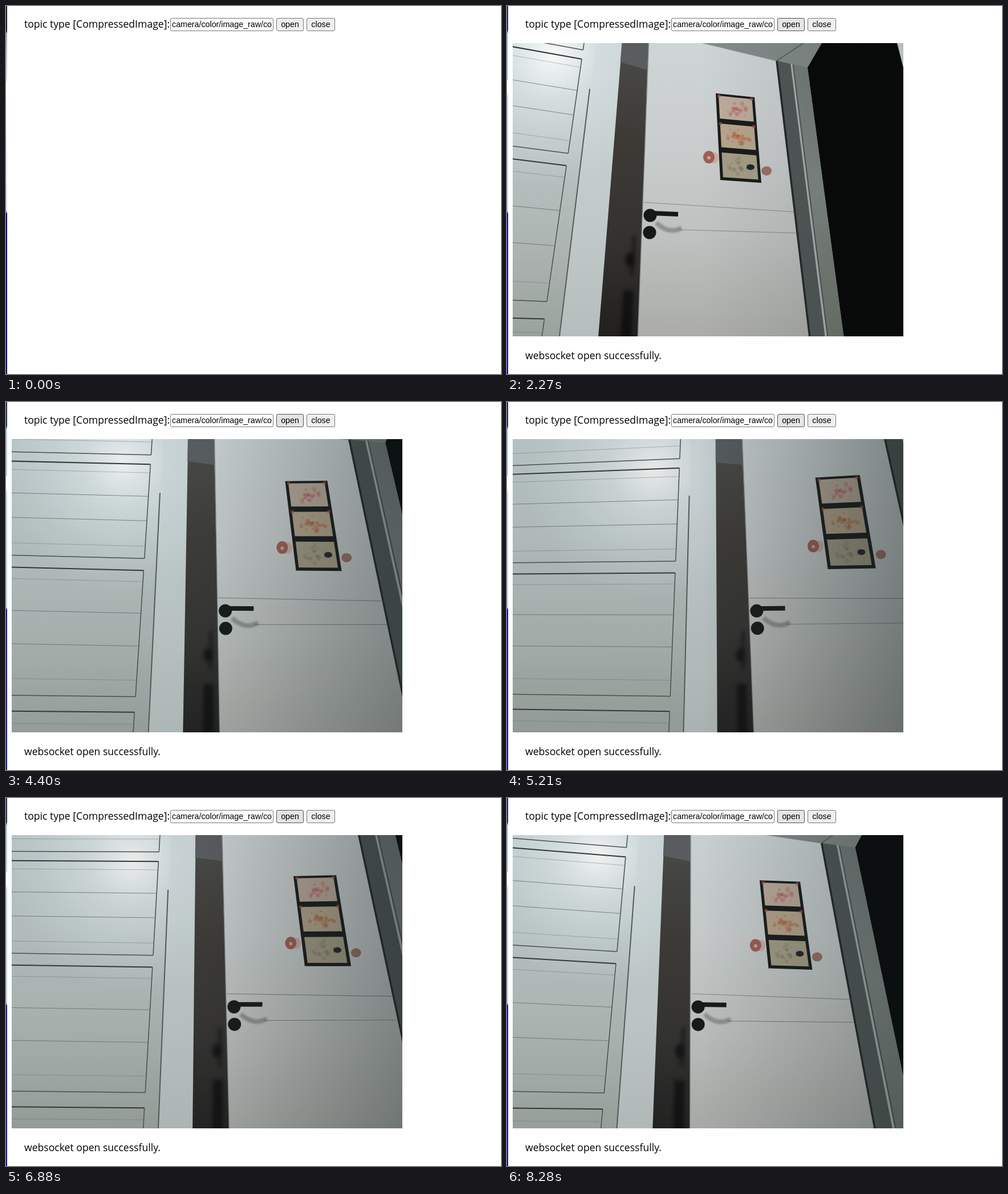
Write an HTML page with a canvas that moves like this. It is 868 px wide and 645 px high and loops after 9280 ms.

```html
<!DOCTYPE html>
<html lang="en">
<head>
<meta charset="utf-8">
<title>Camera topic viewer</title>
<style>
  html, body { margin: 0; width: 100%; height: 100%; overflow: hidden; background: #fff; }
  body { position: relative; color: #000; }
  body > * { position: absolute; box-sizing: border-box; white-space: pre; }
  .label { left: 32px; font: 17.6px/24px "Open Sans", "Noto Sans", sans-serif; }
  .field, .button { top: 21px; height: 23px; border: 1px solid #767676; border-radius: 3px;
    font: 14.25px/21px "Liberation Sans", Arial, sans-serif; }
  .field { left: 288px; width: 181px; padding: 0 2px; }
  .field span { display: block; overflow: hidden; }
  .button { background: #efefef; text-align: center; }
  #open { left: 474px; width: 48px; }
  #open.hover { background: #e5e5e5; border-color: #4f4f4f; }
  #close { left: 527px; width: 50px; }
  #strip { left: 0; top: 0; width: 2px; height: 645px;
    background: linear-gradient(#171a38 44px, #a9a4c4 48px, #dde4f2 130px, #fff 133px, #dfe5ef 360px, #00007c 364px); }
  #strip.later { background: linear-gradient(#24305c 42px, #b9d3ee 48px 128px, #fff 132px 150px, #c3d7ec 160px 360px, #1414a0 364px); }
  #view { left: 10px; top: 65px; }
</style>
</head>
<body>
<div id="strip"></div>
<div class="label" style="top:19px">topic type [CompressedImage]:</div>
<div class="field"><span>camera/color/image_raw/compressed</span></div>
<div class="button" id="open">open</div>
<div class="button" id="close">close</div>
<canvas id="view" width="685" height="514"></canvas>
<div class="label" id="status">websocket open successfully.</div>
<script>
const LOOP = 9280, START = 2270, TURN = 6080, STEP = 200;
const $ = id => document.getElementById(id);
const view = $('view'), ctx = view.getContext('2d');

// Camera pan: 0 faces the door, 1 the closet. Steady turn, then an easing return.
const panAt = time => time < TURN
  ? (time - START) / (TURN - START)
  : .25 + .75 * Math.exp((TURN - time) / 980);

// Four landmarks per wall, as they cross the picture during the pan.
const hinge = p => [[245 + 231 * p, 141 - p], [236 + 257 * p, 390]];
const doorMarks = p => [...hinge(p), [478 + 242 * p + 30 * p * p, 165 - 45 * p - 12 * p * p], [508 + 306 * p, 398 - 15 * p]];
const closetMarks = p => [...hinge(p), [131 + 233 * p, 93 + 31 * p], [70 + 312 * p - 24 * p * p, 518 - 3 * p]];

// Perspective map taking four points to four others.
function homography(from, to) {
  const rows = [];
  from.forEach(([x, y], i) => {
    const [u, v] = to[i];
    rows.push([x, y, 1, 0, 0, 0, -u * x, -u * y, u], [0, 0, 0, x, y, 1, -v * x, -v * y, v]);
  });
  for (let c = 0; c < 8; c++) {
    let best = c;
    for (let r = c; r < 8; r++) if (Math.abs(rows[r][c]) > Math.abs(rows[best][c])) best = r;
    [rows[c], rows[best]] = [rows[best], rows[c]];
    rows[c] = rows[c].map(n => n / rows[c][c]);
    for (let r = 0; r < 8; r++) {
      if (r === c) continue;
      const f = rows[r][c];
      rows[r] = rows[r].map((n, j) => n - f * rows[c][j]);
    }
  }
  const h = rows.map(r => r[8]);
  return (x, y) => {
    const w = h[6] * x + h[7] * y + 1;
    return [(h[0] * x + h[1] * y + h[2]) / w, (h[3] * x + h[4] * y + h[5]) / w];
  };
}

function pencil(map) {
  const trace = pts => {
    ctx.beginPath();
    for (let i = 0; i < pts.length; i += 2) ctx.lineTo(...map(pts[i], pts[i + 1]));
  };
  return {
    poly(fill, ...pts) { trace(pts); ctx.fillStyle = fill; ctx.fill(); },
    line(color, width, ...pts) {
      trace(pts);
      ctx.strokeStyle = color; ctx.lineWidth = width; ctx.stroke();
    },
    dot(fill, x, y, rx, ry = rx) {
      ctx.beginPath();
      ctx.ellipse(...map(x, y), rx, ry, 0, 0, 7);
      ctx.fillStyle = fill; ctx.fill();
    }
  };
}

const mix = (a, b, k) => a + (b - a) * k;

function seeded(seed) {
  return () => (seed = seed * 16807 % 2147483647) / 2147483647;
}

function spread(gradient, ...colors) {
  colors.forEach((c, i) => gradient.addColorStop(i / (colors.length - 1), c));
  return gradient;
}
const downward = (...colors) => spread(ctx.createLinearGradient(0, 65, 0, 579), ...colors);

function cover(fill) {
  ctx.fillStyle = fill;
  ctx.fillRect(10, 65, 685, 514);
}

function drawPanel({ line }, top, bottom) {
  const leftY = y => y + 32 - .108 * (y - 124);
  const leftX = y => 82 - .207 * (leftY(y) - 156);
  const across = (color, width, y) => line(color, width, leftX(y), leftY(y), 366 - y / 64, y);
  across('#343735', 2, top);
  across('#4b504e', 1.5, bottom);
  line('#4b504e', 1.5, 366 - top / 64, top, 366 - bottom / 64, bottom);
  line('rgba(100,110,108,.5)', 1, leftX(top), leftY(top), leftX(bottom), leftY(bottom));
  [.09, .34, .6, .87].forEach((k, i) =>
    across(`rgba(95,106,103,${i % 3 ? .75 : .4})`, 1, mix(top, bottom, k)));
}

function drawCloset(map) {
  const pen = pencil(map), { poly, line, dot } = pen;
  cover(downward('#c4d0d1', '#bdc8c7', '#b2bab7', '#9da5a0'));
  const [gx, gy] = map(320, 130);
  cover(spread(ctx.createRadialGradient(gx, gy, 0, gx, gy, 230),
    'rgba(255,255,255,1)', 'rgba(240,248,250,.55)', 'rgba(232,242,245,.25)', 'rgba(225,235,238,0)'));

  drawPanel(pen, -60, 108);
  drawPanel(pen, 124, 283);
  drawPanel(pen, 303, 515);
  drawPanel(pen, 541, 765);
  line('#343735', 2, 92, 48, 10, 395);
  for (const y of [153, 167, 214, 326]) line('#6a716e', 1, 0, y + 7, 92 - (y - 48) * .236, y);

  // side board and dark gap
  poly('rgba(214,223,226,.5)', 383, 20, 423, 20, 444, 680, 382, 680);
  line('#555b59', 2, 382, 170, 382, 650);
  poly(downward('#4b4b49', '#3d3a36', '#343230', '#201f1e'), 423, 0, 466, 0, 514, 680, 444, 680);
  poly('#5a5e60', 422, -20, 464, -20, 474, 110, 426, 110);
  ctx.filter = 'blur(3px)';
  dot('rgba(10,10,10,.75)', 478, 444, 8, 12);
  line('rgba(10,10,10,.6)', 6, 482, 402, 484, 470);
  line('rgba(8,8,8,.7)', 18, 482, 495, 486, 590);
  ctx.filter = 'none';
}

function drawHanging(map) {
  const local = homography([[0, 0], [1, 0], [1, 3], [0, 3]], [[366, 153], [434, 160], [446, 310], [374, 305]]);
  const { poly, dot } = pencil((x, y) => map(...local(x, y)));
  const random = seeded(29);
  const inks = ['rgba(190,80,80,.3)', 'rgba(175,85,45,.4)', 'rgba(70,70,62,.13)'];
  poly('#171a1a', 0, 0, 1, 0, 1, 3, 0, 3);
  ['#c0ae9e', '#bba88f', '#a9a088'].forEach((paper, i) => {
    const top = i + .08, low = i + .9;
    poly(paper, .07, top, .93, top, .93, low, .07, low);
    for (let n = 0; n < 26; n++) {
      const angle = random() * 2 * Math.PI, reach = random() * .3;
      dot(inks[i], .5 + reach * Math.cos(angle), i + .5 + reach * Math.sin(angle), 1 + 3 * random());
    }
    for (const x of [.08, .92]) if (i < 2) dot('rgba(190,80,70,.6)', x, top, 3);
  });
  dot('#20262b', .76, 2.5, 7, 5);
}

function drawDoor(map) {
  const { poly, line, dot } = pencil(map);
  // wall, dark room and light from above
  poly('#858d8b', 251, -20, 720, -20, 720, 680, 225, 680);
  poly('#050606', 590, 10, 552, 65, 527, 108, 602, 665, 720, 665, 720, 10);
  poly('#dfe5e5', 684, 65, 720, 65, 720, 180, 695, 108);

  // frame, in strips between the leaf and the room
  const strip = (fill, a, b) => poly(fill, mix(473, 527, a), mix(96, 108, a), mix(473, 527, b), mix(96, 108, b),
    mix(541, 602, b), 665, mix(541, 602, a), 665);
  strip('#525958', 0, .45);
  strip('#adb4b2', .45, .51);
  strip('#505655', .51, .55);
  strip(downward('#747c7a', '#838a87', '#70776f'), .55, 1);
  line('#5c6462', 2, 473, 96, 550, 45);

  // leaf
  poly(downward('#d4dadb', '#ced2d2', '#c2c5c3', '#aeb0ac'), 249.5, 35, 262, 45, 473, 96, 541, 665, 226, 665);
  line('#8b9391', 1.5, 249, 42, 473, 96);
  line('#252827', 3.5, 473, 96, 541, 665);
  line('rgba(90,96,95,.6)', 1.5, 249.5, 35, 226, 665);
  line('rgba(110,116,114,.7)', 1.2, 240, 344, 505, 361);
  line('rgba(110,116,114,.7)', 1.2, 300, 392, 508, 398);

  drawHanging(map);
  dot('#cdb0a2', 363, 266, 8, 10);
  dot('#a05f56', 354, 265, 10, 11);
  dot('#d0a79c', 354, 266, 3);
  dot('#9f7167', 455, 289, 9, 8);

  // handle, its shadow and the lock
  const arc = [];
  for (let k = 0; k <= 1; k += .1) arc.push(262 + 44 * k, 380 + 42 * k - 33 * k * k);
  ctx.filter = 'blur(1.5px)';
  line('rgba(95,98,96,.5)', 8, ...arc);
  ctx.filter = 'none';
  line('#141718', 8, 253, 363, 300, 365);
  dot('#141718', 251, 367, 11.5);
  dot('#141718', 250, 397, 11.5);
}

function drawView(p) {
  ctx.setTransform(1, 0, 0, 1, -10, -65);
  drawCloset(homography(closetMarks(1), closetMarks(p)));
  drawDoor(homography(doorMarks(0), doorMarks(p)));
  // exposure drops with the pan, and light falls off to the right
  cover(`rgba(60,72,72,${.03 + .12 * p})`);
  cover(spread(ctx.createLinearGradient(340, 0, 695, 0), 'rgba(18,28,28,0)', `rgba(18,28,28,${.17 + .3 * p})`));
}

let shown = -1;
function frame(now) {
  const time = now % LOOP;
  $('open').className = time >= 640 ? 'button hover' : 'button';
  $('strip').className = time >= 1070 ? 'later' : '';
  $('status').hidden = time < 1270;
  $('status').style.top = (time < 1870 ? 246 : 600) + 'px';
  view.hidden = time < START;
  const step = Math.min(30, Math.floor((time - START) / STEP));
  if (step >= 0 && step !== shown) {
    drawView(panAt(START + step * STEP));
    shown = step;
  }
  requestAnimationFrame(frame);
}
frame(0);
</script>
</body>
</html>
```
